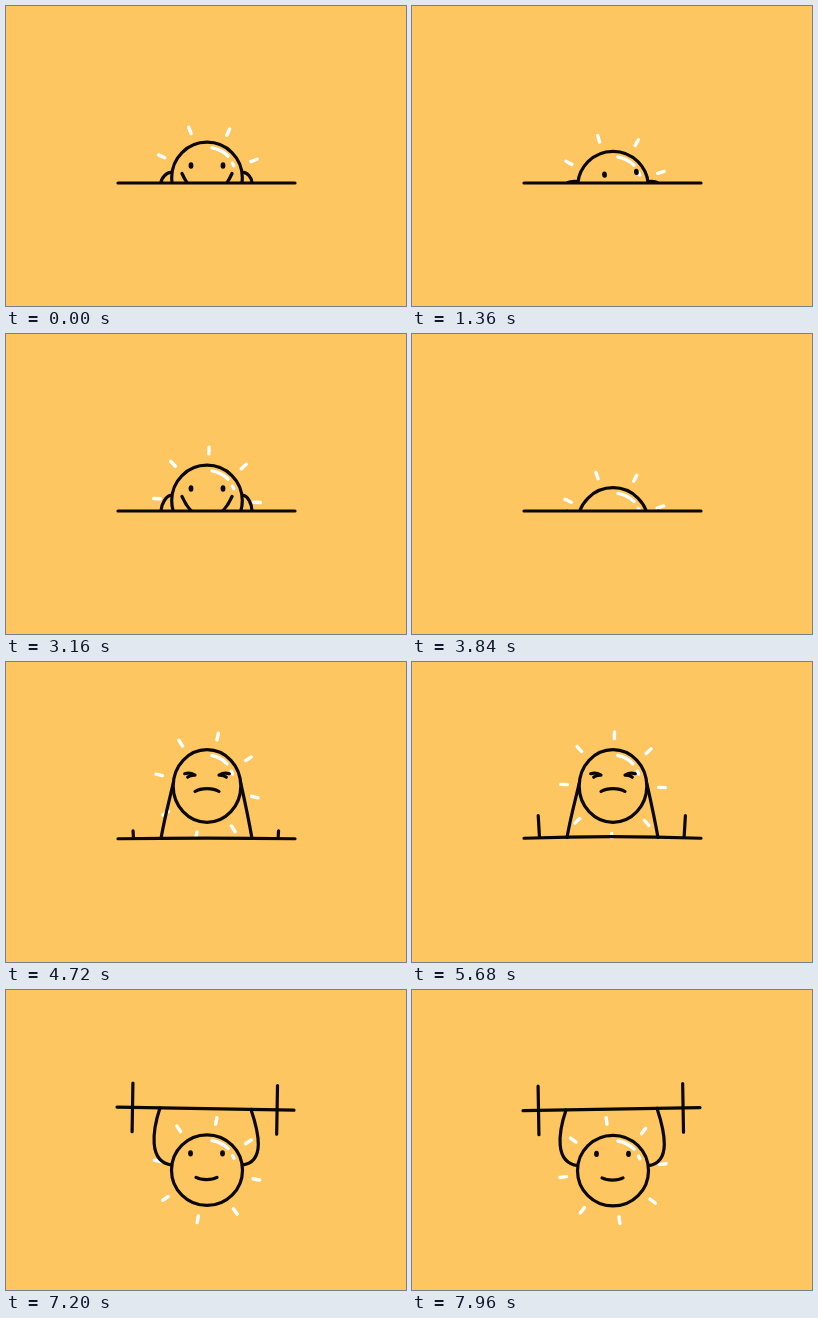
Animation of 400x300 px, one loop 8 s. Source, as an HTML page:

```html
<!DOCTYPE html>
<html lang="en">
<head>
<meta charset="utf-8">
<title>Sunrise workout</title>
<style>
  html, body { margin: 0; width: 100%; height: 100%; overflow: hidden; background: #fdc660; }
  svg { display: block; width: 100%; height: 100%; }
  .ink { fill: none; stroke: #0b0803; stroke-width: 3.2; stroke-linecap: round; stroke-linejoin: round; }
  .white { fill: none; stroke: #fff; stroke-width: 3.4; stroke-linecap: round; }
</style>
</head>
<body>
<svg viewBox="0 0 400 300">
  <defs><clipPath id="sky"><rect id="skyRect" width="400" height="177"/></clipPath></defs>
  <rect width="400" height="300" fill="#fdc660"/>
  <g clip-path="url(#sky)">
    <path id="rays" class="white"/>
    <path id="arms" class="ink"/>
    <g id="sun">
      <ellipse id="disc" class="ink" style="fill:#fdc660"/>
      <path id="shine" class="white" d="M5 -29.6A30 30 0 0 1 21 -21.5M25.4 -14.5L26.8 -11.8"/>
      <g id="dots" fill="#0b0803">
        <ellipse cx="-16" cy="-12" rx="2.4" ry="3.2"/>
        <ellipse cx="16" cy="-12" rx="2.4" ry="3.2"/>
      </g>
      <path id="squint" class="ink" d="M-22.3 -12.3Q-17 -14 -12 -10.8Q-17 -11 -19.3 -8.8M22.3 -12.3Q17 -14 12 -10.8Q17 -11 19.3 -8.8"/>
      <path id="mouth" class="ink"/>
    </g>
    <path id="plates" class="ink"/>
  </g>
  <path id="bar" class="ink"/>
  <g id="drops" fill="#fff">
    <ellipse id="dropL" rx="1.8" ry="2.6"/>
    <ellipse id="dropR" rx="1.7" ry="2.6"/>
  </g>
</svg>
<script>
const LOOP = 8000, SPIN = 35.5, R = 35.3;
const $ = id => document.getElementById(id);
const set = (id, attrs) => { for (const k in attrs) $(id).setAttribute(k, attrs[k]); };
const show = (id, on) => set(id, { visibility: on ? 'visible' : 'hidden' });
const rad = deg => deg * Math.PI / 180;

function draw(t) {
  // Eased progress from 0 to 1 between two times
  const ramp = (a, b) => (1 - Math.cos(Math.PI * Math.min(1, Math.max(0, (t - a) / (b - a))))) / 2;

  // The story: sink, peek again, duck, pop up, strain, lift, drop, rest
  const sink = ramp(880, 1720), peek = ramp(2480, 3000), duck = ramp(3400, 3800);
  const pop = ramp(4080, 4420), grow = ramp(4600, 4900), pull = ramp(5700, 5900);
  const lift = ramp(5900, 6300), drop = ramp(6310, 6820), rest = ramp(6600, 6900);
  const glance = ramp(880, 1360) - ramp(1500, 1900);
  const hidden = ramp(1500, 1900) - peek + duck - pop;
  const since = Math.max(0, t - 6800);
  const bob = 4 * Math.exp(-since / 500) * Math.sin(since / 110);

  const cx = 201;
  const cy = 171.5 + 15 * sink - 20 * peek + 22.5 * duck - 65 * pop - 5 * pull + 12 * lift + 50 * drop + bob;
  const rx = R - 1.5 * pop + 5 * lift - 3.3 * drop;
  const ry = R + pop - lift;
  const barX = 200.5 - rest;
  const barY = 177 - 1.5 * grow - 111 * lift + 55 * drop + bob;
  const tilt = -rest * Math.cos((t - 7960) / 250);

  set('skyRect', { height: 177 + 123 * ramp(5900, 6000) });

  // Rays follow half of the squash
  const kx = (1 + rx / R) / 2, ky = (1 + ry / R) / 2;
  let d = '';
  for (let k = 0; k < 8; k++) {
    const a = rad(k * 45 - 20 + SPIN * t / 1000), x = kx * Math.cos(a), y = ky * Math.sin(a);
    d += `M${cx + 46.7 * x} ${cy + 46.7 * y}L${cx + 53.4 * x} ${cy + 53.4 * y}`;
  }
  set('rays', { d });

  // Arms run from the grip on the bar to the shoulder
  const out = -4 * pop + 11.5 * lift;
  const reach = 6 - 2 * pop + 11 * lift + 9 * rest;
  const sag = -1 + 19 * pop - 29 * lift + 8 * rest;
  d = '';
  for (const side of [-1, 1]) {
    const gx = barX + side * 45.5, gy = barY + side * 45.5 * Math.sin(rad(tilt));
    const sx = cx + side * (rx - .5), sy = cy - 5;
    d += `M${gx} ${gy}C${gx + side * out} ${gy + (sy - gy) * .4} ${sx + side * reach} ${sy + sag} ${sx} ${sy}`;
  }
  set('arms', { d });

  set('sun', { transform: `translate(${cx} ${cy})` });
  set('disc', { rx, ry });
  set('shine', { transform: `scale(${rx / R} ${ry / R})` });

  // Face: grin, frown, then smile
  const fx = 8.5 * glance - .5 * rest, fy = 13 * hidden - 4.8 * rest;
  set('dots', { transform: `translate(${fx} ${fy - 1.5 * glance}) rotate(${-5 * glance})` });
  const strain = t > 4400 && t < 6660;
  show('squint', strain);
  show('dots', !strain);
  const w = 25 - 13 * pop - 1.5 * lift;
  const y = -4 + 9.5 * pop - 8 * lift + 9.8 * rest;
  const dip = y + .65 * (44 - 50 * pop + 15.5 * lift - 5 * rest);
  set('mouth', {
    transform: `translate(${fx} ${12 * hidden + 4 * glance})`,
    d: `M${-w} ${y}C${-w * .5} ${dip} ${w * .5} ${dip} ${w} ${y}`
  });

  const place = `translate(${barX} ${barY}) rotate(${tilt})`;
  const bow = 2.5 * grow * (1 - lift), lean = 1.3 * grow * (1 - lift);
  const half = 22 * grow + 2.3 * lift;
  set('bar', { transform: place, d: `M-88.5 ${bow * .3}Q0 ${-bow} 88.5 ${bow * .3}` });
  set('plates', { transform: place, d: [-1, 1].map(s =>
    `M${s * (72.3 + lean) - .7} ${-half}L${s * (72.3 - lean) - .7} ${half}`).join('') });
  show('plates', grow > 0);

  // Sweat flying off
  const p = (t - 6280) / 400;
  show('drops', p > 0 && p < 1);
  set('dropL', { cx: 150 - 53 * p, cy: 100 - 38 * p });
  set('dropR', { cx: 240 + 40 * p, cy: 140 - 23 * p });
}

const start = performance.now();
function tick() {
  draw((performance.now() - start) % LOOP);
  requestAnimationFrame(tick);
}
tick();
</script>
</body>
</html>
```
